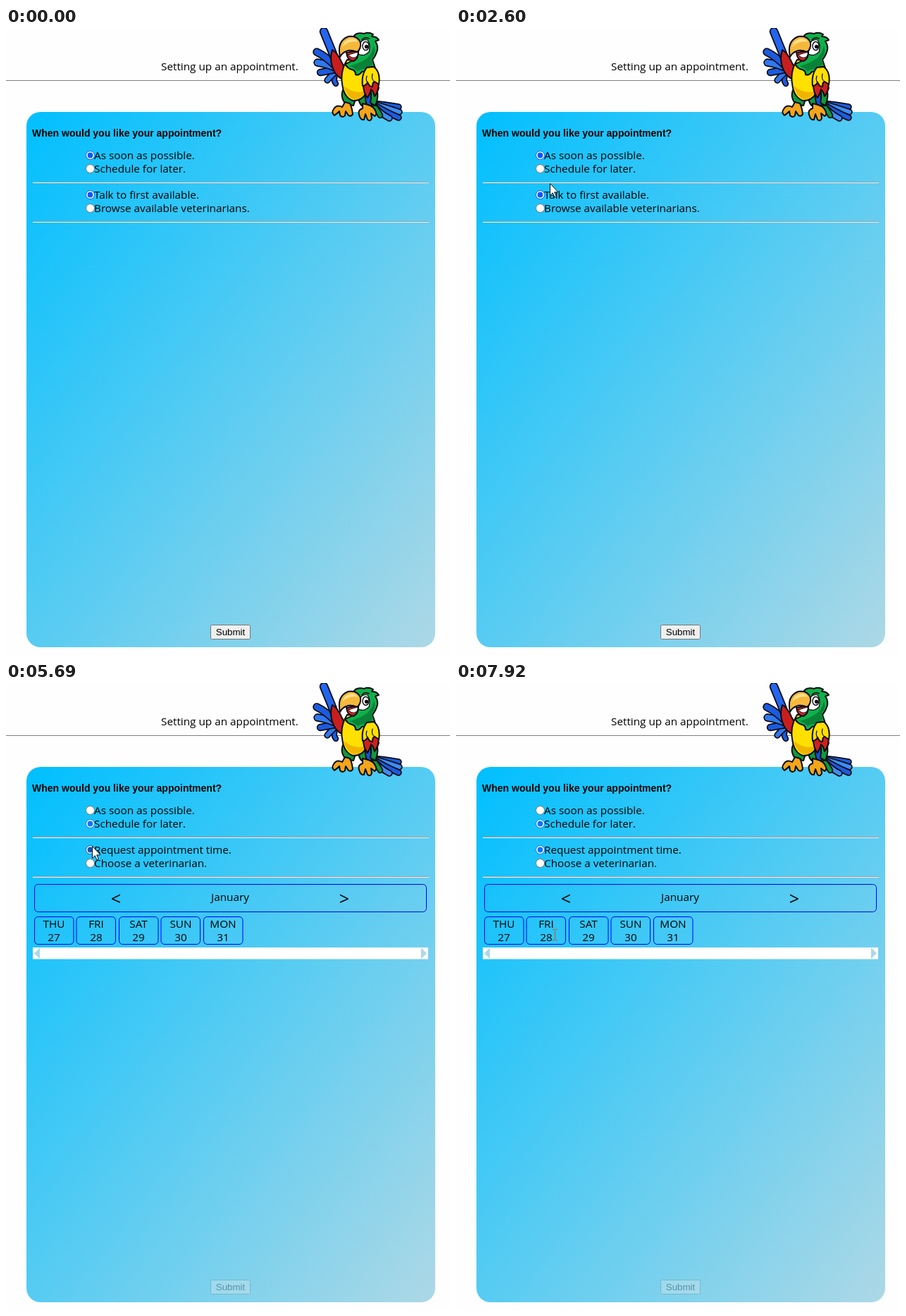
Write an HTML page that moves like this. It is 630 px wide and 889 px high and loops after 7.99 s.

```html
<!DOCTYPE html>
<html lang="en">
<head>
<meta charset="utf-8">
<title>Setting up an appointment</title>
<style>
html, body { margin: 0; width: 100%; height: 100%; overflow: hidden; background: #fefefe; }
#card { position: absolute; left: 29px; top: 119px; width: 580px; height: 759px; border-radius: 20px;
  background: linear-gradient(to bottom right, deepskyblue, lightblue); }
svg { position: absolute; left: 0; top: 0; }
text { font: 15.3px "Open Sans", "Noto Sans", sans-serif; }
.mid { text-anchor: middle; }
.head { font: bold 14px "Liberation Sans", Arial, sans-serif; }
.btn { font: 13.33px "Liberation Sans", Arial, sans-serif; }
.arrow { font-size: 25px; }
.box { fill: none; stroke: #00f; }
#bird { stroke: #0b0b10; stroke-width: 2; stroke-linejoin: round; stroke-linecap: round; }
</style>
</head>
<body>
<div id="card"></div>
<svg width="630" height="889" viewBox="0 0 630 889">
  <path d="M0 74.5H630" stroke="#808080"/>
  <text x="220" y="60">Setting up an appointment.</text>
  <g id="bird">
    <g id="tail"></g>
    <g id="wing"></g>
    <path fill="#c81e1e" d="M463 31Q471 36 476 48L483 61 478 73Q467 68 463 55 459 43 463 31Z"/>
    <path fill="#0e9a3c" d="M479 86Q473 97 482 108L493 110 497 98ZM500 98Q501 112 512 113L522 110 526 92Z"/>
    <path fill="#ffe000" d="M484 45Q474 61 477 79 479 98 492 103 506 104 512 90L518 60 505 46Z"/>
    <path fill="#f0b400" stroke="none" d="M479 82Q484 98 493 101 505 102 510 89 495 95 479 82Z"/>
    <path fill="#0fb04a" d="M492 14Q496 5 508 8 514 5 521 9L519 12Q526 12 529 17L524 19Q528 24 527 31 525 39 520 45L524 57Q520 53 517 56 517 63 512 67 510 61 505 62 501 68 496 66 496 60 491 59 485 58 481 51 488 49 493 45 499 37 496 27Z"/>
    <path fill="#0a8338" stroke="none" d="M522 25Q526 36 519 43L521 50 512 62Q508 55 499 61 493 56 488 54 501 50 509 45 519 39 522 25Z"/>
    <path fill="#fff" stroke-width="1.2" d="M502 23Q505 15 513 17 518 24 515 34 508 41 500 37Z"/>
    <ellipse cx="510.500" cy="25.500" rx="4.500" ry="6" fill="#fff" stroke-width="1.400"/>
    <circle cx="511.500" cy="26.500" r="1.700" fill="#111"/>
    <path fill="none" stroke-width="1.600" d="M505 17Q509 12 515 15"/>
    <path fill="#d62424" d="M483 35L500 32Q501 43 493 47 484 46 483 35Z"/>
    <path fill="#fff" stroke-width="1" d="M486 38L499 34Q500 40 495 42 489 43 486 38Z"/>
    <path fill="#f6b83c" d="M474 41Q469 18 486 12 499 10 503 21 504 30 498 34 488 30 483 33 477 35 474 41Z"/>
    <path fill="#ffe08a" stroke="none" d="M477 27Q480 16 490 15 497 15 499 20 487 17 477 27Z"/>
    <path fill="#1552d8" d="M510 87Q508 102 514 114 520 109 523 100L529 85Z"/>
    <path fill="#0e9a3c" d="M521 75Q532 92 524 110L517 106Q520 92 515 82Z"/>
    <path fill="#cf2020" d="M507 75Q506 91 513 99 517 92 518 87 522 91 523 97 531 87 528 68Z"/>
    <path fill="#ffe000" d="M512 56Q504 66 506 82 511 82 513 77 516 84 520 83 520 77 523 76L529 80Q532 63 522 55Z"/>
    <path fill="none" stroke-width="1.200" d="M512 68Q510 74 513 77M520 65Q518 73 523 76"/>
    <g fill="#f3a51c">
      <path d="M481 105L477 112Q469 108 465 115 461 120 466 124 471 120 473 118L474 124Q478 128 481 124L482 118 486 124Q490 126 492 122 491 113 488 107Z"/>
      <path d="M506 107L506 114Q499 116 501 123 503 131 508 130L510 122 513 130Q517 133 519 128L518 121 523 125Q527 123 524 117 521 111 514 109Z"/>
    </g>
  </g>
  <text class="head" x="37" y="154">When would you like your appointment?</text>
  <g id="rules"></g>
  <text x="125" y="186">As soon as possible.</text>
  <text x="125" y="205">Schedule for later.</text>
  <text id="l2" x="125" y="242"></text>
  <text id="l3" x="125" y="261"></text>
  <g id="radios"></g>
  <g id="cal">
    <rect class="box" x="40.500" y="285.500" width="556" height="39" rx="5"/>
    <text class="arrow mid" x="156" y="315">&lt;</text>
    <text class="mid" x="318" y="309">January</text>
    <text class="arrow mid" x="480" y="315">&gt;</text>
    <g id="days"></g>
    <path fill="#fff" d="M38 375H599V391.500H38Z"/>
    <path fill="lightblue" d="M48 375.500V391L40 383.200ZM589 375.500V391L597 383.200Z"/>
  </g>
  <g id="submit">
    <rect x="290.500" y="846.500" width="56" height="20" rx="2" fill="#efefef" stroke="#767676"/>
    <text class="btn mid" x="318.500" y="861">Submit</text>
  </g>
  <circle id="click" r="11" fill="#ffec2e" opacity=".68"/>
  <g id="cursor">
    <path id="pointer" fill="#fff" stroke="#111" d="M.5.500V17.500L4.300 13.800 6.900 19.700 9.300 18.600 6.700 12.800H12Z"/>
    <path id="beam" fill="none" stroke="#b85c30" d="M-3.500-7.500H-1L0-6.500 1-7.500H3.500M0-6.500V6.500M-3.500 7.500H-1L0 6.500 1 7.500H3.500"/>
  </g>
</svg>
<script>
const $ = id => document.getElementById(id);
const LOOP = 7990, LATER = 4090, CALENDAR = 5690;
const radioY = [180.5, 199.5, 236.5, 255.5];

// Each feather is a curve from root to tip, outlined by a wider dark stroke.
function feathers(id, x, y, list) {
  $(id).innerHTML = list.map(([cx, cy, tx, ty, w, color]) => {
    const d = `M${x} ${y}Q${cx} ${cy} ${tx} ${ty}`;
    return `<path fill="none" stroke-width="${w + 3.5}" d="${d}"/>` +
      `<path fill="none" stroke="${color}" stroke-width="${w}" d="${d}"/>`;
  }).join('');
}
feathers('tail', 519, 107, [
  [535, 108, 557, 112, 6, '#1b5be0'], [540, 113, 558, 119, 6, '#3d8df5'],
  [538, 119, 557, 127, 6, '#1b5be0'], [530, 121, 544, 128, 6, '#3d8df5'],
  [527, 116, 531, 124, 5, '#0e9a3c']]);
feathers('wing', 472, 58, [
  [462, 72, 468, 79, 5, '#1b5be0'], [459, 70, 456, 74, 6, '#2f78f0'],
  [458, 61, 446, 63, 7, '#1b5be0'], [456, 51, 442, 49, 8, '#2f78f0'],
  [454, 40, 441, 34, 8, '#1b5be0'], [462, 31, 451, 5, 9, '#2265ee']]);

$('rules').innerHTML = [218, 274].map(y =>
  `<path stroke="#9aa0a4" d="M38 ${y + .5}H600"/><path stroke="#eee" d="M38 ${y + 1.5}H600"/>`).join('');
$('radios').innerHTML = radioY.map(y =>
  `<circle cx="119.500" cy="${y}" r="6" fill="#fff"/><circle cx="119.500" cy="${y}" r="3.900"/>`).join('');
$('days').innerHTML = ['THU', 'FRI', 'SAT', 'SUN', 'MON'].map((day, i) => {
  const x = 40 + i * 60;
  return `<rect class="box" x="${x + .5 - (i % 2) * .5}" y="331.500" width="55.500" height="39" rx="5"/>` +
    `<text class="mid" x="${x + 28}" y="347">${day}</text><text class="mid" x="${x + 28}" y="366">${27 + i}</text>`;
}).join('');

// Pointer moves: first step, last step, step count, start, bend, end.
const moves = [
  [1160, 1650, 8, [627, 755], [441, 586], [255, 418]],
  [1980, 2740, 11, [255, 418], [188, 309], [121, 201]],
  [2810, 2880, 2, [121, 201], [121, 200], [121, 199]],
  [4340, 4960, 9, [121, 199], [121, 215], [122, 231]],
  [6190, 6960, 12, [122, 231], [145, 295], [84, 349]],
  [7030, 7230, 4, [84, 349], [78, 346], [75, 350]],
  [7300, 7780, 7, [75, 350], [95, 375], [127, 357]],
  [7850, 7920, 2, [127, 357], [133, 357], [140, 357]]
];

function pointerAt(t) {
  const move = moves.filter(m => t >= m[0]).pop();
  if (!move) return null;
  const [from, to, n, a, b, c] = move;
  const step = Math.floor((t - from + 1) / (to - from) * (n - 1));
  const p = Math.min(1, (step + 1) / n), s = p * p * (3 - 2 * p);
  return a.map((v, i) => Math.round((1 - s) ** 2 * v + 2 * s * (1 - s) * b[i] + s * s * c[i]));
}

const show = (id, on) => $(id).setAttribute('display', on ? 'inline' : 'none');

function render(t) {
  const later = t >= LATER, calendar = t >= CALENDAR, pos = pointerAt(t);
  $('l2').textContent = later ? 'Request appointment time.' : 'Talk to first available.';
  $('l3').textContent = later ? 'Choose a veterinarian.' : 'Browse available veterinarians.';
  show('cal', calendar);
  $('submit').setAttribute('opacity', later ? .3 : 1);

  const checked = [!later, later, !later || calendar, false];
  radioY.forEach((y, i) => {
    const [ring, dot] = [...$('radios').children].slice(i * 2, i * 2 + 2);
    const hover = pos && Math.hypot(pos[0] - 119.5, pos[1] - y) < 7;
    const blue = hover ? '#0a55b8' : later ? '#0a75ff' : '#0a58fa';
    ring.setAttribute('stroke', checked[i] ? blue : hover ? '#4f4f4f' : '#767676');
    dot.setAttribute('fill', checked[i] ? blue : 'none');
  });

  const first = t >= 4010 && t < LATER, second = t >= 5560 && t < CALENDAR;
  show('click', first || second);
  show('cursor', pos);
  if (!pos) return;
  $('click').setAttribute('cx', pos[0] - 1);
  $('click').setAttribute('cy', pos[1] + 1);
  const overDays = pos[1] > 333 && calendar;
  show('pointer', !overDays);
  show('beam', overDays);
  $('cursor').setAttribute('transform', `translate(${pos[0] + (overDays ? .5 : 0)} ${pos[1]})`);
}

const start = performance.now();
function tick() {
  render((performance.now() - start) % LOOP);
  requestAnimationFrame(tick);
}
tick();
</script>
</body>
</html>
```
